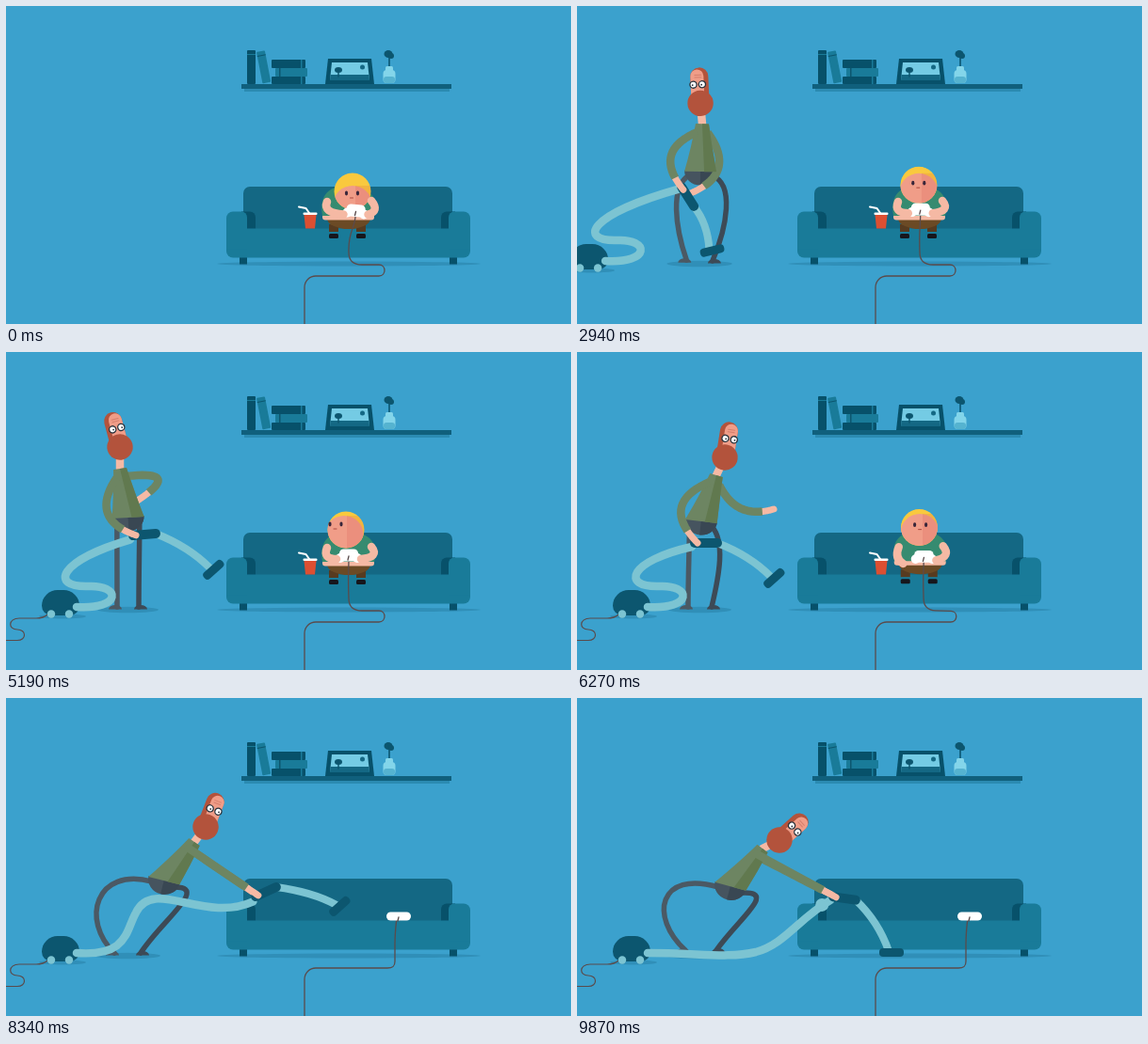
Animation, 600 px wide and 338 px high, one loop 9.9 s. Source, as an HTML page with a canvas:

```html
<!DOCTYPE html>
<html lang="en">
<head>
<meta charset="utf-8">
<title>Living room</title>
<style>
html, body { margin: 0; width: 100%; height: 100%; overflow: hidden; background: #3ba1cd; }
canvas { display: block; width: 600px; height: 338px; }
</style>
</head>
<body>
<canvas id="stage"></canvas>
<script>
const LOOP = 9900;
const canvas = document.getElementById('stage');
const c = canvas.getContext('2d');
const scale = Math.max(1, window.devicePixelRatio || 1);
canvas.width = 600 * scale;
canvas.height = 338 * scale;

const DEEP = '#07516a', DARK = '#0c566f', BACK = '#146884', MID = '#197b99';
const LIGHT = '#7cc4d2', SHADE = '#308fb8', CORD = '#5a4b4c', SKIN = '#f5b9a4';
const FACE = '#f09d88', GREEN = '#6d8562', RED = '#b3533c', SHIRT = '#368b70';
const INK = '#29313a';

const clamp = v => Math.max(0, Math.min(1, v));
const mix = (a, b, k) => a + (b - a) * k;
const blend = (p, q, k) => p.map((v, i) => mix(v, q[i], k));
const ease = (t, from, to) => { const u = clamp((t - from) / (to - from)); return u * u * (3 - 2 * u); };
const slope = (p, q, j) => p && q ? (q[j] - p[j]) / (q[0] - p[0]) : 0;
const tangent = (l, r) => l * r > 0 ? 2 * l * r / (l + r) : 0;

// Smooth interpolation of [time, ...values] without overshoot.
function track(keys, t) {
  let i = 0;
  while (i < keys.length - 2 && t > keys[i + 1][0]) i++;
  const a = keys[i], b = keys[i + 1], h = b[0] - a[0], u = clamp((t - a[0]) / h);
  return a.slice(1).map((v, n) => {
    const j = n + 1, d = slope(a, b, j);
    const m0 = tangent(slope(keys[i - 1], a, j), d) * h;
    const m1 = tangent(d, slope(b, keys[i + 2], j)) * h;
    return mix(v, b[j], u * u * (3 - 2 * u)) + u * (1 - u) * ((1 - u) * m0 - u * m1);
  });
}

// spine: hip, neck, beard, head angle, facing; feet: x, y, knee bow;
// wand: handle, angle, end, nozzle angle; arms: front bow, back hand, back bow
const pose = (spine, left, right, wand, arms) => [...spine, ...left, ...right, ...wand, ...arms];
const enter = pose([47, 212, 27, 159, 6, 150, -70, -1], [-5, 271, -30], [66, 271, 44],
  [-45, 220, 140, -80, 264, 0], [8, -30, 214, -8]);
const turn = pose([131, 183, 130, 125, 126, 103, -10, -1], [116, 271, -20], [144, 271, 26],
  [110, 204, 70, 124, 262, -10], [28, 116, 200, -28]);
const sweep = pose([131, 184, 140, 127, 144, 107, 26, -1], [117, 262, -22], [143, 271, 22],
  [138, 199, 0, 208, 236, -40], [28, 134, 195, -28]);
const look = pose([130, 183, 121, 124, 121, 101, -15, 1], [118, 271, 0], [141, 271, 0],
  [147, 194, -5, 220, 231, -42], [28, 138, 159, -40]);
const ask = pose([131, 187, 148, 131, 157, 112, 9, 1], [118, 271, 0], [143, 271, 14],
  [137, 203, 0, 209, 240, -42], [32, 209, 167, 18]);
const tall = pose([136, 177, 136, 111, 140, 84, 4, 1], [118, 271, 0], [146, 271, 2],
  [156, 197, -10, 232, 215, -42], [30, 152, 195, -25]);
const reach = pose([166, 201, 200, 153, 212, 137, 21, 1], [115, 271, -60], [143, 271, 38],
  [276, 206, -25, 354, 221, -42], [0, 263, 207, 0]);
const bend = pose([161, 207, 197, 160, 215, 151, 48, 1], [115, 268, -64], [148, 268, 41],
  [284, 213, 8, 334, 270, 0], [0, 274, 211, 0]);

const dadKeys = [
  [2010, enter], [2850, turn], [3350, sweep], [4100, sweep], [4550, look], [5400, look],
  [6080, ask], [7420, ask], [7900, tall], [8340, reach], [8620, blend(reach, tall, .2)],
  [8920, reach], [9300, blend(bend, tall, .5)], [9870, bend]
].map(([t, p]) => [t, ...p]);
const canKeys = [[2200, -70], [2800, 5], [3780, 46], [4120, 58]];
const hoses = [
  [124, 274, 122, 247, 87, 249, 46, 250, 55, 222],
  [130, 275, 127, 247, 138, 228, 156, 190, 210, 240],
  [130, 271, 160, 277, 190, 270, 220, 262, 235, 235]];

const boyKeys = [[6150, 364, 208], [6680, 374, 202], [6880, 384, 208],
  [7080, 388, 247], [7380, 413, 247], [8250, 656, 247]];
// head, hairline and face offsets
const front = [-2, -20, 0, 5, 0, -4], aside = [-3, -19, -2, 5, -11, -6];
const rise = [0, -23, 2, 7, 3, -1], walk = [-11, -30, 8, 6, 11, -5];
const headKeys = [[4300, front], [4700, aside], [5500, aside], [6100, front], [6600, rise], [7080, walk]]
  .map(([t, p]) => [t, ...p]);

function fill(color, build) {
  c.beginPath(); build(); c.fillStyle = color; c.fill();
}
function line(color, width, build, cap = 'round') {
  c.beginPath(); build();
  c.strokeStyle = color; c.lineWidth = width; c.lineCap = cap; c.lineJoin = 'round';
  c.stroke();
}
const oval = (color, x, y, rx, ry = rx) => fill(color, () => c.ellipse(x, y, rx, ry, 0, 0, 7));
const box = (color, x, y, w, h, r = 0) => fill(color, () => c.roundRect(x, y, w, h, r));
const taper = (color, x, y, top, base, h) => fill(color, () => {
  c.moveTo(x - top, y); c.lineTo(x + top, y); c.lineTo(x + base, y + h); c.lineTo(x - base, y + h);
});
const seg = (color, w, x1, y1, x2, y2, cap) =>
  line(color, w, () => { c.moveTo(x1, y1); c.lineTo(x2, y2); }, cap);
function at(x, y, deg, draw) {
  c.save(); c.translate(x, y); c.rotate(deg * Math.PI / 180); draw(); c.restore();
}

function shelf() {
  box('#2b8bb2', 253, 87, 218, 4);
  box('#10607d', 250, 83, 223, 5);
  const book = (x, y, w, h, color, bx, by, bw, bh, band) => {
    box(color, x, y, w, h, 1);
    box(band, x + bx, y + by, bw, bh);
  };
  book(256, 47, 9, 36, DEEP, 0, 4, 9, 1, MID);
  at(266, 49, -11, () => book(0, 0, 9, 34, MID, 0, 4, 9, 1, DARK));
  book(282, 57, 36, 9, DEEP, 31, 0, 1.5, 9, MID);
  book(286, 66, 34, 9, MID, 4, 0, 1.5, 9, DARK);
  book(282, 75, 36, 8, DEEP, 31, 0, 1.5, 8, MID);
  taper(DEEP, 365, 56, 23, 26, 27);
  taper('#74cbe4', 365, 60, 19, 21, 19);
  taper(BACK, 365, 73, 20.5, 21, 6);
  oval(BACK, 378.5, 65, 2.5);
  oval(DARK, 353, 68, 4, 3);
  seg(DARK, 1.5, 353, 68, 353, 75);
  seg(DEEP, 1.5, 407, 52, 407, 66);
  oval(DARK, 406, 51, 4.5, 4);
  oval(DARK, 409, 53, 3);
  box('#83d5ea', 403, 64, 8, 8, 1.5);
  box('#83d5ea', 400.5, 68, 13, 14, 4);
  box('#55b3d0', 401, 75, 12, 7, 3);
}

function sofa() {
  oval(SHADE, 364, 274, 140, 2.5);
  [248, 471].forEach(x => box(DEEP, x, 264, 8, 10.5));
  box(BACK, 252, 192, 222, 60, 7);
  box(DEEP, 250, 218.5, 15, 24, [0, 6, 0, 0]);
  box(DEEP, 462, 218.5, 15, 24, [6, 0, 0, 0]);
  box(MID, 234, 236.5, 259, 31, 7);
  box(MID, 234, 218.5, 22, 40, [7, 6, 0, 0]);
  box(MID, 470, 218.5, 23, 40, [6, 7, 0, 0]);
}

function drawCup(x, y, rot) {
  at(x, y, rot, () => {
    line('#fff', 2, () => { c.moveTo(-1, -8); c.lineTo(-4.5, -13); c.lineTo(-12, -14.5); });
    taper('#dc4f32', 0, -6, 6.5, 5, 14.5);
    box('#fff', -7.5, -8.5, 15, 2.6, 1);
  });
}

function padAt(t, lean, play) {
  const k = ease(t, 6200, 6600);
  return { k, x: mix(364 + 7.5 * lean * play, 417, k), y: mix(216 + 1.5 * lean * play, 232, k), rot: 6 * lean * play };
}

function drawPad({ k, x, y, rot }) {
  const p = (a, b) => mix(a, b, k), h = p(13, 9);
  line(CORD, 1.3, () => {
    c.moveTo(x - 2 * k, y + 1);
    c.bezierCurveTo(x - 4 * k, y + 19, p(363, 413), p(238, 250), p(364, 413), 262);
    c.bezierCurveTo(p(364, 413), p(272, 266), p(370, 413), p(275, 270), p(378, 413), p(275, 274));
    c.lineTo(p(396, 413), p(275, 280));
    c.bezierCurveTo(p(404, 413), p(275, 285), p(404, 411), 287, p(396, 405), 287);
    c.arcTo(317, 287, 317, 300, 12);
    c.lineTo(317, 340);
  });
  at(x, y, rot, () => {
    box('#fff', p(-10, -13), -h / 2, p(20, 26), h, 4.5);
    if (k < 1) [-1, 1].forEach(s => oval('#fff', s * p(9, 8), p(3, 0), p(5, 3)));
  });
  seg(CORD, 1.3, x, y + 1, x - 1, y + 5);
}

function boyFace(x, y, mood) {
  const ink = '#38263a', lip = '#a9483f';
  [-1, 1].forEach(s => {
    const ex = x + s * 6;
    if (mood === 'dot') oval(ink, ex, y, 1.6, 2.4);
    if (mood === 'angry') seg(ink, 2, ex + s * 3, y - 1, ex, y + 1.2);
    if (mood === 'smile') line(ink, 1.3, () => c.arc(ex, y + 1, 2.3, 3.4, 6));
  });
  if (mood === 'angry') oval('#d8402f', x + 1, y + 7, 3.4, 2.8);
  else if (mood === 'smile') line(lip, 1.2, () => c.arc(x, y + 4, 2.8, .3, 2.8));
  else seg(lip, 1, x - 2, y + 5, x + 1, y + 5);
}

function moodAt(t) {
  if (t < 1100) return 'dot';
  if (t < 2700) return 'angry';
  if (t < 3300) return 'dot';
  return t < 4500 || t > 6850 ? 'smile' : 'dot';
}

function boy(t) {
  const [bx, by] = track(boyKeys, t);
  const lean = Math.cos(t * Math.PI / 670), play = 1 - ease(t, 2500, 3200);
  const playing = [4.5 * lean - .5, 2.5 * lean - 13.5, 0, 13 + lean, -.5, 2];
  const [hx, hy, sx, sy, fx, fy] = blend(track(headKeys, t), playing, play);
  const pad = padAt(t, lean, play);
  const stand = clamp((t - 6680) / 350), step = t > 7080 ? Math.sin((t - 7200) / 115) : 0;
  const y = by - Math.abs(step) * 2 + 1.5 * stand;
  const lift = ease(t, 6450, 7040);
  const mug = [mix(323, bx + 20, lift), mix(228, by - 19, lift), 20 * lift];

  [-1, 1].forEach(s => {
    const foot = mix(s < 0 ? -16 : 13, s * 20 * step, stand);
    const fy = by + 37 - stand * (4 + (s < 0 ? 7 : -1.4) * Math.max(0, step) + (s > 0 ? 7 : 0) * Math.max(0, -step));
    seg('#573b20', 10, bx + mix(foot, s * 11, stand), y + 24, bx + foot, fy - 5, 'butt');
    box('#16161c', bx + foot - 5, fy - 3, 10 + 2 * stand, 5, 1.5);
  });
  fill('#6b4a25', () => c.ellipse(bx, y + 18, 23 + 3 * stand, 11 + 2 * stand, 0, 0, Math.PI));
  box(SKIN, bx - 28, y + 13, 55, 6.5, 3);
  fill(SHIRT, () => {
    c.moveTo(bx - 28, y + 15);
    c.bezierCurveTo(bx - 32, y - 8, bx - 20, y - 16, bx - 4, y - 17);
    c.bezierCurveTo(bx + 22, y - 18, bx + 33, y - 4, bx + 27, y + 15);
  });

  const cx = bx + hx, cy = y + hy;
  c.save();
  c.beginPath(); c.arc(cx, cy, 19.5, 0, 7); c.clip();
  oval('#f9c93e', cx, cy, 20);
  oval(FACE, cx + sx, cy + sy, 20.5, 20);
  box('rgba(205,70,70,.16)', cx + 3 + sx, cy - 20 + sy, 30, 50);
  c.restore();
  boyFace(cx + fx, cy + fy, moodAt(t));

  if (t < 6550) drawPad(pad);
  if (t > 6450) drawCup(...mug);
  const grab = clamp((t - 6200) / 250);
  const limb = (x1, y1, x2, y2, x3, y3) =>
    line(SKIN, 8.5, () => { c.moveTo(x1, y1); c.quadraticCurveTo(x2, y2, x3, y3); });
  limb(bx + mix(-23, -1, stand), y + 5 * stand, bx + mix(-28, 16, stand), y + mix(12, 9, stand),
    mix(pad.x - 13, mug[0], grab), mix(pad.y + 4, mug[1] + 6, grab));
  if (t < 6650) limb(bx + 24, y - 1, bx + 33, y + 10, pad.x + 13, pad.y + 4);
}

function vacuum(cx) {
  oval(SHADE, cx + 2, 281, 25, 2.5);
  const o = (cx - 58) / 2;
  line(CORD, 1.2, () => {
    c.moveTo(cx - 14, 279); c.quadraticCurveTo(cx - 18, 283, cx - 26, 283);
    c.lineTo(14 + o, 283); c.bezierCurveTo(2 + o, 283, 2 + o, 295, 12 + o, 295);
    c.bezierCurveTo(22 + o, 295, 22 + o, 306.5, 12 + o, 306.5); c.lineTo(-10, 306.5);
  });
  box(DARK, cx - 20, 253, 40, 27, [18, 18, 11, 11]);
  [-10, 9].forEach(x => oval(LIGHT, cx + x, 278.5, 4.2));
}

function drawHose(cx, t, ex, ey) {
  const k = track([[7500, 0], [8340, 1], [9870, 2]], t)[0], i = Math.min(1, Math.floor(k));
  const p = blend(hoses[i], hoses[i + 1], k - i).map((v, n) => n % 2 ? v : v + cx - 58);
  line(LIGHT, 8.5, () => {
    c.moveTo(cx + 17, 271);
    c.bezierCurveTo(...p.slice(0, 6));
    c.bezierCurveTo(...p.slice(6), ex, ey);
  });
  if (t > 9300) oval(LIGHT, ex - 9, ey + 5, 7);
}

function drawArm([sx, sy], x, y, bow) {
  const d = Math.hypot(x - sx, y - sy) || 1, nx = (sy - y) / d * bow, ny = (x - sx) / d * bow;
  const point = u => {
    const b = 3 * u * (1 - u);
    return [mix(sx, x, u) + nx * b, mix(sy, y, u) + ny * b];
  };
  const part = (from, to) => () => {
    for (let i = 0; i <= 16; i++) c.lineTo(...point(mix(from, to, i / 16)));
  };
  line(SKIN, 7, part(.84, 1));
  line(GREEN, 8.5, part(0, .84), 'butt');
}

function dadHead(x, y, angle, dir) {
  at(x, y, angle, () => {
    box(RED, -9.5, -38, 19, 42, [10, 10, 2, 2]);
    box(FACE, -7 + dir * 2.5, -36, 14, 38, [7, 7, 0, 0]);
    [-30, -27.5].forEach(wy => seg('#d57f6d', 1, dir * 2 - 3, wy, dir * 2 + 4, wy));
    oval(RED, 0, 0, 13.7);
    [-4.7, 4.7].forEach(s => {
      oval('#fff', dir * 2 + s, -20, 3.6);
      line(INK, 1.3, () => c.arc(dir * 2 + s, -20, 3.6, 0, 7));
      oval(INK, dir * 2.8 + s, -19.6, .9);
    });
  });
}

function dad(t) {
  const p = track(dadKeys, t), cx = track(canKeys, t)[0];
  const [hx, hy, nx, ny, bx, by, angle, dir] = p;
  const left = p.slice(8, 11), right = p.slice(11, 14);
  let [gx, gy, ga, ex, ey, nozzle, bowL, rx, ry, bowR] = p.slice(14);
  const stroke = Math.abs(t - 3780) < 440 ? 12 * Math.sin((t - 3780) / 140) ** 2 : 0;
  gx += stroke * .3; ex += stroke; ey -= stroke * .4;

  const tilt = Math.atan2(nx - hx, hy - ny), lean = tilt * .4;
  const spin = (ox, oy, a) => (x, y) =>
    [ox + x * Math.cos(a) - y * Math.sin(a), oy + x * Math.sin(a) + y * Math.cos(a)];
  const onHip = spin(hx, hy, lean), onNeck = spin(nx, ny, tilt);
  const onGrip = spin(gx, gy, ga * Math.PI / 180);

  oval(SHADE, (left[0] + right[0]) / 2, 274, Math.abs(right[0] - left[0]) / 2 + 21, 3.2);
  vacuum(cx);
  [[right, 1, '#3d4a56'], [left, -1, '#4b5964']].forEach(([[fx, fy, bow], s, color]) => {
    const [x, y] = onHip(s * 12, -3);
    line(color, 5.5, () => {
      c.moveTo(x, y);
      c.bezierCurveTo(x + bow, y + 26 - Math.abs(bow) * .7, fx + bow * .6, fy - 35, fx, fy);
    });
    fill(color, () => c.ellipse(fx + s * 2, fy + 2.5, 7, 4.5, 0, Math.PI, 0));
  });

  const [tx, ty] = onGrip(-15, 0);
  drawHose(cx, t, tx, ty + 4);

  c.save();
  c.translate(...onHip(0, -8)); c.rotate(lean);
  fill('#46545f', () => c.ellipse(0, 0, 17, 15.5, 0, 0, Math.PI));
  fill('#394753', () => { c.ellipse(0, 0, 17, 15.5, 0, 0, Math.PI / 2); c.lineTo(0, 0); });
  c.restore();

  drawArm(onNeck(6, 9), rx, ry, bowR);
  seg(SKIN, 8.5, nx, ny, bx, by);
  const torso = half => () => {
    c.moveTo(...onNeck(half ? 0 : -7, 0));
    if (half) c.lineTo(...onHip(4, -7));
    else c.quadraticCurveTo(...onNeck(-10, 22), ...onHip(-17, -7));
    c.lineTo(...onHip(17, -7));
    c.quadraticCurveTo(...onNeck(11, 24), ...onNeck(7, 0));
  };
  fill(GREEN, torso(false));
  fill('#61794f', torso(true));

  line(LIGHT, 8, () => {
    const [x, y] = onGrip(12, 0);
    c.moveTo(x, y);
    c.quadraticCurveTo((x + ex) / 2 + 5, (y + ey) / 2 - 5, ex - 3, ey - 1);
  }, 'butt');
  at(ex, ey, nozzle, () => box(DARK, -13, -4, 26, 9, 4));
  at(gx, gy, ga, () => box(DARK, -17, -5, 34, 10, 5));
  dadHead(bx, by, angle, dir);
  drawArm(onNeck(-5, 9), ...onGrip(-9, 0), bowL);
}

function draw(t) {
  c.setTransform(scale, 0, 0, scale, 0, 0);
  c.fillStyle = '#3ba1cd';
  c.fillRect(0, 0, 600, 338);
  shelf();
  sofa();
  if (t <= 6450) drawCup(323, 228, 0);
  if (t >= 6550) drawPad(padAt(t, 0, 0));
  if (t < 8400) boy(t);
  if (t > 1500) {
    const away = Math.max(0, (2010 - t) / 510);
    c.translate(-112 * away * away, 0);
    dad(t);
  }
}

const start = performance.now();
function frame() {
  draw((performance.now() - start) % LOOP);
  requestAnimationFrame(frame);
}
frame();
</script>
</body>
</html>
```
